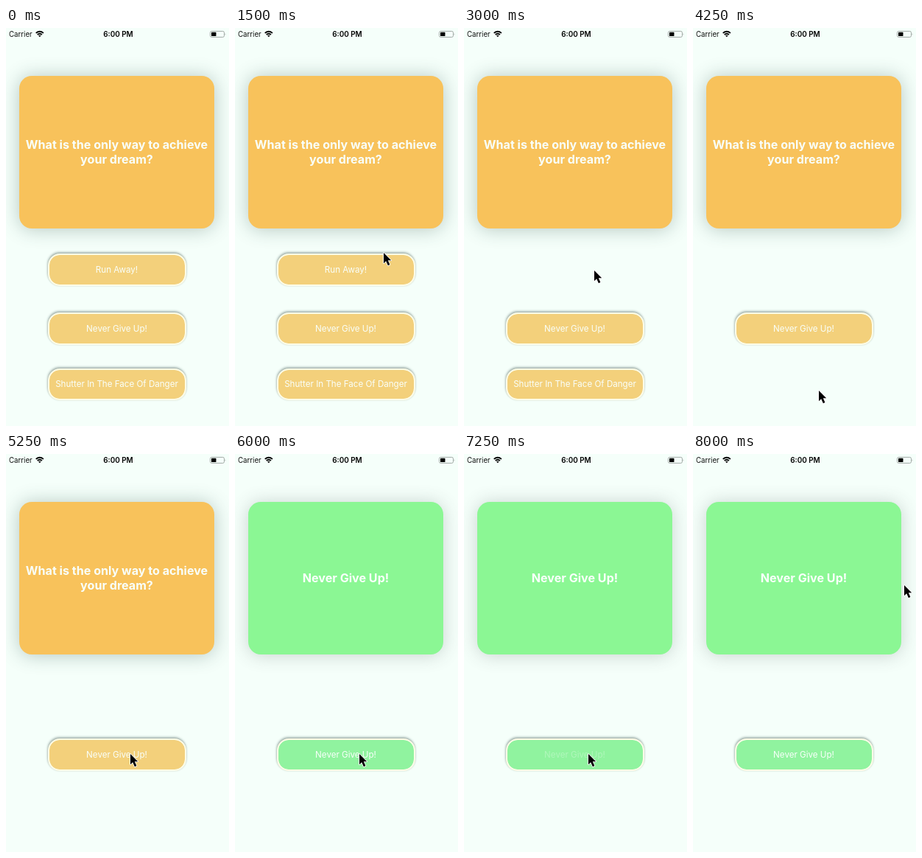
These frames come from a looping animation (303 by 540 pixels, 9.5 s). An HTML page:

```html
<!DOCTYPE html>
<html lang="en">
<head>
<meta charset="utf-8">
<title>Quiz card</title>
<style>
  html, body { margin: 0; width: 100%; height: 100%; overflow: hidden; background: #f5fffa; }
  body { position: relative; font-family: Inter, Roboto, sans-serif; color: #f9fffb; }

  .status { position: absolute; top: 2px; line-height: 13px; font-size: 9.7px; color: #111; white-space: nowrap; }
  .carrier { left: 4px; }
  .clock { left: 0; width: 305px; text-align: center; font-weight: 600; font-size: 9.9px; color: #000; }
  svg { position: absolute; left: 0; top: 0; width: 303px; height: 540px; overflow: visible; }

  .card {
    position: absolute; left: 18px; top: 65px; width: 265px; height: 207px;
    display: flex; align-items: center; justify-content: center;
    border-radius: 17px; text-align: center; white-space: nowrap;
    font-weight: 700; font-size: 16.1px; line-height: 19.3px;
  }
  .front { background: #f8c25b; box-shadow: 0 1px 26px rgba(45, 80, 75, .32); }
  .back { background: #8bf794; box-shadow: 0 1px 24px rgba(60, 70, 70, .24); }

  .answer {
    position: absolute; left: 56.5px; width: 184px; height: 39.5px;
    display: flex; align-items: center; justify-content: center;
    border: 2.5px solid #fdfce6; border-radius: 16px;
    background: #f3d07b; background-clip: padding-box;
    box-shadow: -.5px -2px 3px rgba(40, 65, 60, .36), 0 0 2px rgba(90, 110, 90, .25);
    font-size: 11.6px; white-space: nowrap;
  }
  .run { top: 306.3px; }
  .never { top: 386px; }
  .shutter { top: 461.5px; }

  /* Everything shares one clock and holds each pose for a quarter second or more. */
  .card, .answer, .answer span, .cursor { animation: 9.5s step-end infinite; }
  .front { animation-name: front; }
  .back { animation-name: back; }
  .run { animation-name: run; }
  .run span { animation-name: run-press; }
  .shutter { animation-name: shutter; }
  .shutter span { animation-name: shutter-press; }
  .never { animation-name: correct; }
  .never span { animation-name: never-press; }
  .cursor { animation-name: point; }

  @keyframes front {
    0%, 68.42% { visibility: visible; }
    57.89%, 76.31%, 100% { visibility: hidden; }
  }
  @keyframes back {
    0%, 68.42% { visibility: hidden; }
    57.89%, 76.31%, 100% { visibility: visible; }
  }
  @keyframes run { 0% { opacity: 1; } 31.57%, 100% { opacity: 0; } }
  @keyframes run-press { 0% { opacity: 1; } 28.94%, 100% { opacity: .3; } }
  @keyframes shutter { 0% { opacity: 1; } 44.73%, 100% { opacity: 0; } }
  @keyframes shutter-press { 0% { opacity: 1; } 42.1%, 100% { opacity: .3; } }
  @keyframes correct { 0% { background-color: #f3d07b; } 57.89%, 100% { background-color: #90f39f; } }
  @keyframes never-press {
    0%, 60.52%, 73.68%, 78.94%, 100% { opacity: 1; }
    57.89%, 68.42%, 76.31% { opacity: .3; }
    71.05% { opacity: .8; }
  }
  @keyframes point {
    0% { opacity: 0; transform: translate(283px, 271px); }
    10.52% { opacity: 1; transform: translate(283px, 271px); }
    13.15% { opacity: 1; transform: translate(238px, 284px); }
    15.78% { opacity: 1; transform: translate(202px, 305px); }
    18.42% { opacity: 1; transform: translate(184px, 345px); }
    21.05% { opacity: 1; transform: translate(180px, 369px); }
    23.68% { opacity: 1; transform: translate(178px, 342px); }
    26.31% { opacity: 1; transform: translate(177px, 329px); }
    36.84% { opacity: 1; transform: translate(176px, 380px); }
    39.47% { opacity: 1; transform: translate(172px, 504px); }
    42.1% { opacity: 1; transform: translate(171px, 492px); }
    50% { opacity: 1; transform: translate(170px, 450px); }
    52.63% { opacity: 1; transform: translate(169px, 413px); }
    55.26% { opacity: 1; transform: translate(169px, 407px); }
    81.57% { opacity: 1; transform: translate(232px, 290px); }
    84.21%, 100% { opacity: 1; transform: translate(287px, 178px); }
  }
</style>
</head>
<body>
  <div class="status carrier">Carrier</div>
  <div class="status clock">6:00 PM</div>
  <svg viewBox="0 0 303 540">
    <g fill="none" stroke="#000" stroke-width="1.9">
      <path d="M40.7 6.9Q45.8 2.5 50.9 6.9"/>
      <path d="M42.7 9Q45.8 6.4 48.9 9"/>
    </g>
    <path d="M44 10.3Q45.8 9 47.6 10.3L45.8 12.2Z"/>
    <rect x="277.5" y="4.4" width="19" height="8" rx="2" fill="none" stroke="#999f9c" stroke-width=".9"/>
    <rect x="279" y="5.8" width="6.5" height="5.3" rx=".7"/>
    <path d="M297.7 7Q299.2 8.4 297.7 9.8Z" fill="#999f9c"/>
  </svg>

  <div class="card front"><div>What is the only way to achieve<br>your dream?</div></div>
  <div class="card back">Never Give Up!</div>

  <div class="answer run"><span>Run Away!</span></div>
  <div class="answer never"><span>Never Give Up!</span></div>
  <div class="answer shutter"><span>Shutter In The Face Of Danger</span></div>

  <svg viewBox="0 0 303 540">
    <path class="cursor" d="M0 0V14.2L3.2 11.2L5.9 17.2L8.4 16.1L5.8 10.3H10.2Z"
          stroke="#fff" stroke-width="1.6" stroke-linejoin="round" paint-order="stroke"/>
  </svg>
</body>
</html>
```
